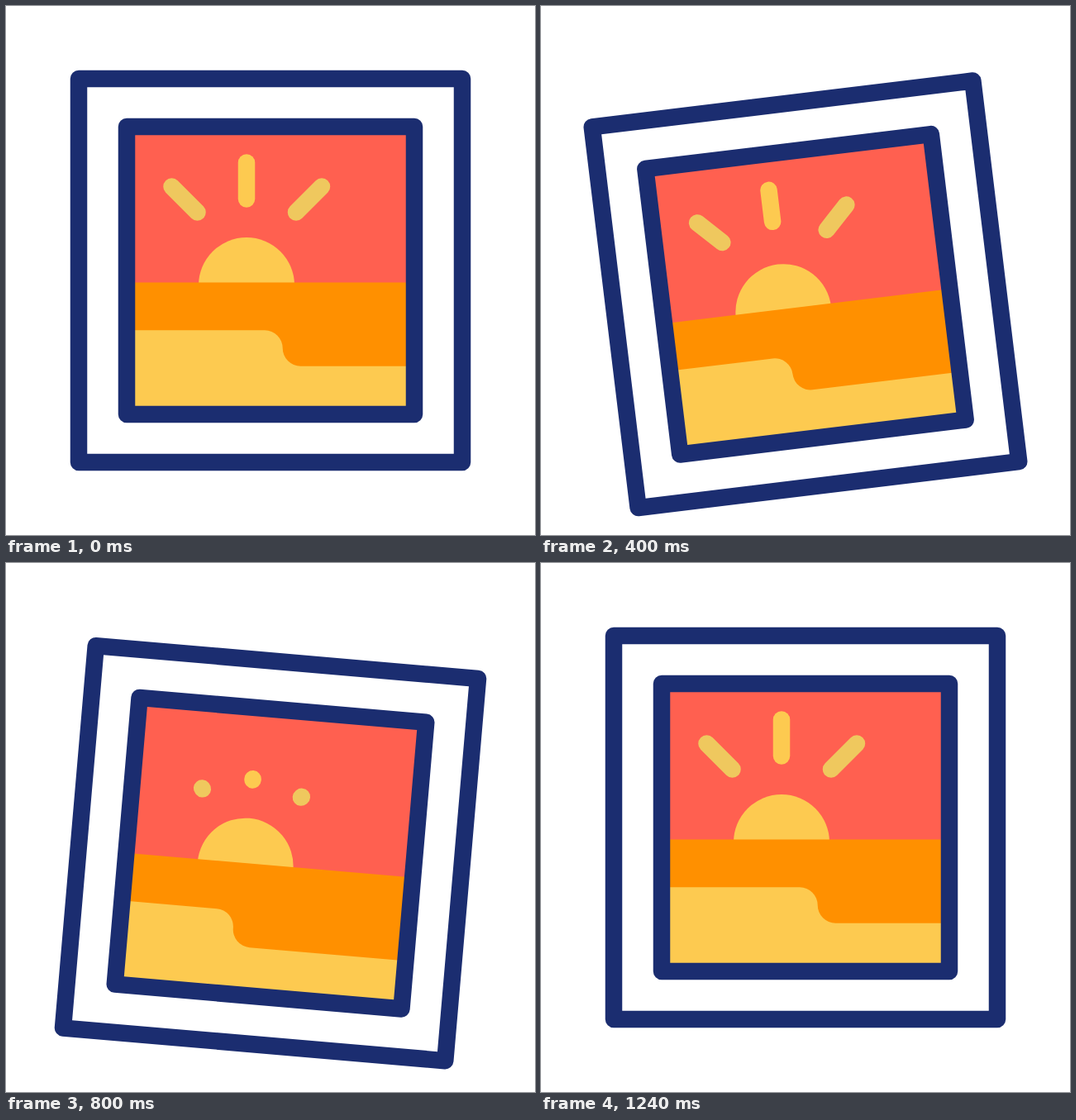
Animation, 640 px wide and 640 px high, one loop 1280 ms. Source, as an HTML page:

```html
<!DOCTYPE html>
<html lang="en">
<head>
<meta charset="utf-8">
<title>Swinging picture</title>
<style>
  html, body { margin: 0; width: 100%; height: 100%; overflow: hidden; background: #fff; }
  svg { display: block; width: 100%; height: 100%; }
  .frame { fill: none; stroke: #1b2d70; stroke-width: 20.5; stroke-linejoin: round; }
  .ray { stroke: #efc85e; stroke-width: 20.5; stroke-linecap: round; }
  .ray.mid { stroke: #fdca50; }
</style>
</head>
<body>
<svg viewBox="0 0 640 640">
  <defs>
    <clipPath id="view"><rect x="146" y="146" width="348" height="348"/></clipPath>
  </defs>
  <g id="picture">
    <g clip-path="url(#view)">
      <rect x="146" y="146" width="348" height="348" fill="#ff6050"/>
      <circle cx="291" cy="338" r="58" fill="#fdca50"/>
      <rect x="146" y="334.5" width="348" height="160" fill="#ff9000"/>
      <path id="sand" fill="#fdca50"
        d="M60 500V392.3H313a21.7 21.7 0 0 1 21.7 21.7a21.7 21.7 0 0 0 21.7 21.7H580V500z"/>
      <line class="ray"/>
      <line class="ray mid"/>
      <line class="ray"/>
    </g>
    <rect class="frame" x="146" y="146" width="348" height="348"/>
    <rect class="frame" x="88" y="88" width="464" height="464"/>
  </g>
</svg>
<script>
const LOOP = 1280, STEP = 40;

// Symmetric cubic-bezier(p, 0, 1 - p, 1)
function ease(x, p) {
  let lo = 0, hi = 1;
  for (let i = 0; i < 30; i++) {
    const s = (lo + hi) / 2, r = 1 - s;
    if (3 * p * s * r * r + 3 * (1 - p) * s * s * r + s ** 3 < x) lo = s;
    else hi = s;
  }
  return lo * lo * (3 - 2 * lo);
}

// Keys are [time, value] pairs
function track(keys, t, p = 0.6) {
  if (t <= keys[0][0]) return keys[0][1];
  for (let i = 1; i < keys.length; i++) {
    const [t0, a] = keys[i - 1], [t1, b] = keys[i];
    if (t < t1) return a + (b - a) * ease((t - t0) / (t1 - t0), p);
  }
  return keys[keys.length - 1][1];
}

const swing = [[40, 0], [360, -7], [840, 5], [1240, 0]];
const drop = [[42, 0], [600, 37], [1242, 0]];
const slide = [[40, 0], [640, -57.4], [1240, 0]];
const shrink = [[260, 0], [728, 1]];
const grow = [[730, 0], [1184, 1]];

// Inner end, outer end
const rays = [
  [231.5, 249.5, 200.5, 218.5],
  [291, 233.4, 291, 189.6],
  [351, 249.5, 382, 218.5]
];

const picture = document.getElementById('picture');
const sand = document.getElementById('sand');
const lines = [...document.querySelectorAll('.ray')];

function draw(t) {
  const angle = track(swing, t), y = track(drop, t, 0.55);
  picture.setAttribute('transform', `translate(0 ${y}) rotate(${angle} 320 320)`);
  sand.setAttribute('transform', `translate(${track(slide, t)} 0)`);

  const growing = t >= grow[0][0];
  const from = growing ? 0 : track(shrink, t);
  const to = growing ? track(grow, t) : 1;
  rays.forEach(([x0, y0, x1, y1], i) => {
    const set = (n, k) => {
      lines[i].setAttribute('x' + n, x0 + (x1 - x0) * k);
      lines[i].setAttribute('y' + n, y0 + (y1 - y0) * k);
    };
    set(1, from);
    set(2, to);
  });
}

const start = performance.now();
function tick() {
  const t = (performance.now() - start) % LOOP;
  draw(Math.floor(t / STEP) * STEP);
  requestAnimationFrame(tick);
}
tick();
</script>
</body>
</html>
```
